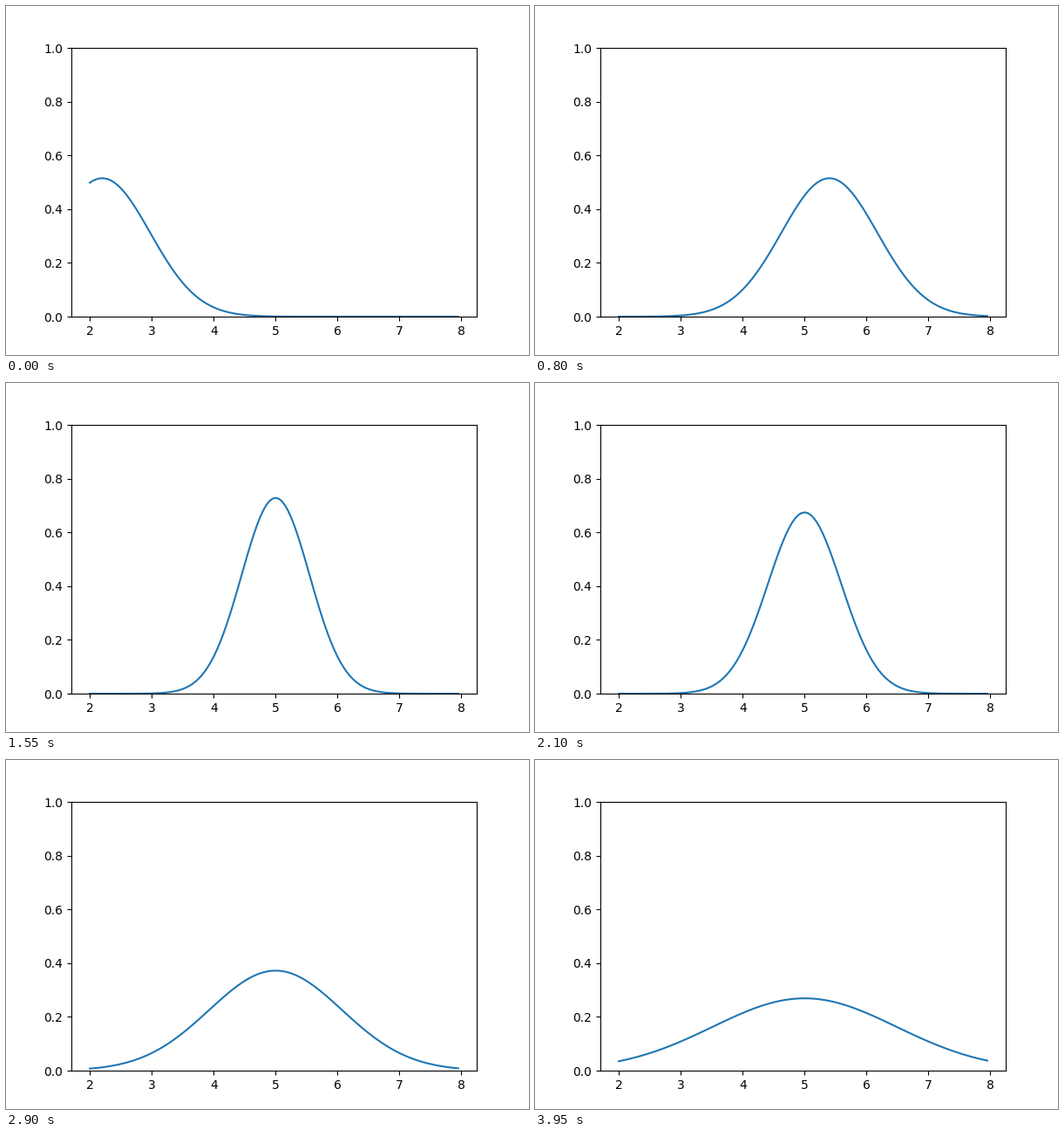
A matplotlib script that plays this animation: 600x400 px, repeating every 4 s.

```python
import numpy as np
import matplotlib.pyplot as plt
from matplotlib.animation import FuncAnimation

FRAMES = 80
INTERVAL = 50
RESET = 25      # the curve jumps back to the centre
NARROWEST = 36  # variance shrinks until here, then grows


def gaussian(x, mean, var):
    return np.exp(-(x - mean) ** 2 / (2 * var)) / np.sqrt(2 * np.pi * var)


def params(i):
    """Mean and variance of the curve at step i."""
    if i < RESET:
        return 2.2 + 0.2 * i, 0.6
    return 5.0, 0.05 + 0.05 * abs(i - NARROWEST)


xs = np.arange(2, 8, 0.05)

fig, ax = plt.subplots(figsize=(6, 4), dpi=100)
line, = ax.plot(xs, gaussian(xs, *params(0)))
ax.set_ylim(0, 1)


def update(i):
    line.set_ydata(gaussian(xs, *params(i)))
    return line,


anim = FuncAnimation(fig, update, frames=FRAMES, interval=INTERVAL,
                     repeat=True, repeat_delay=0)
plt.show()
```
